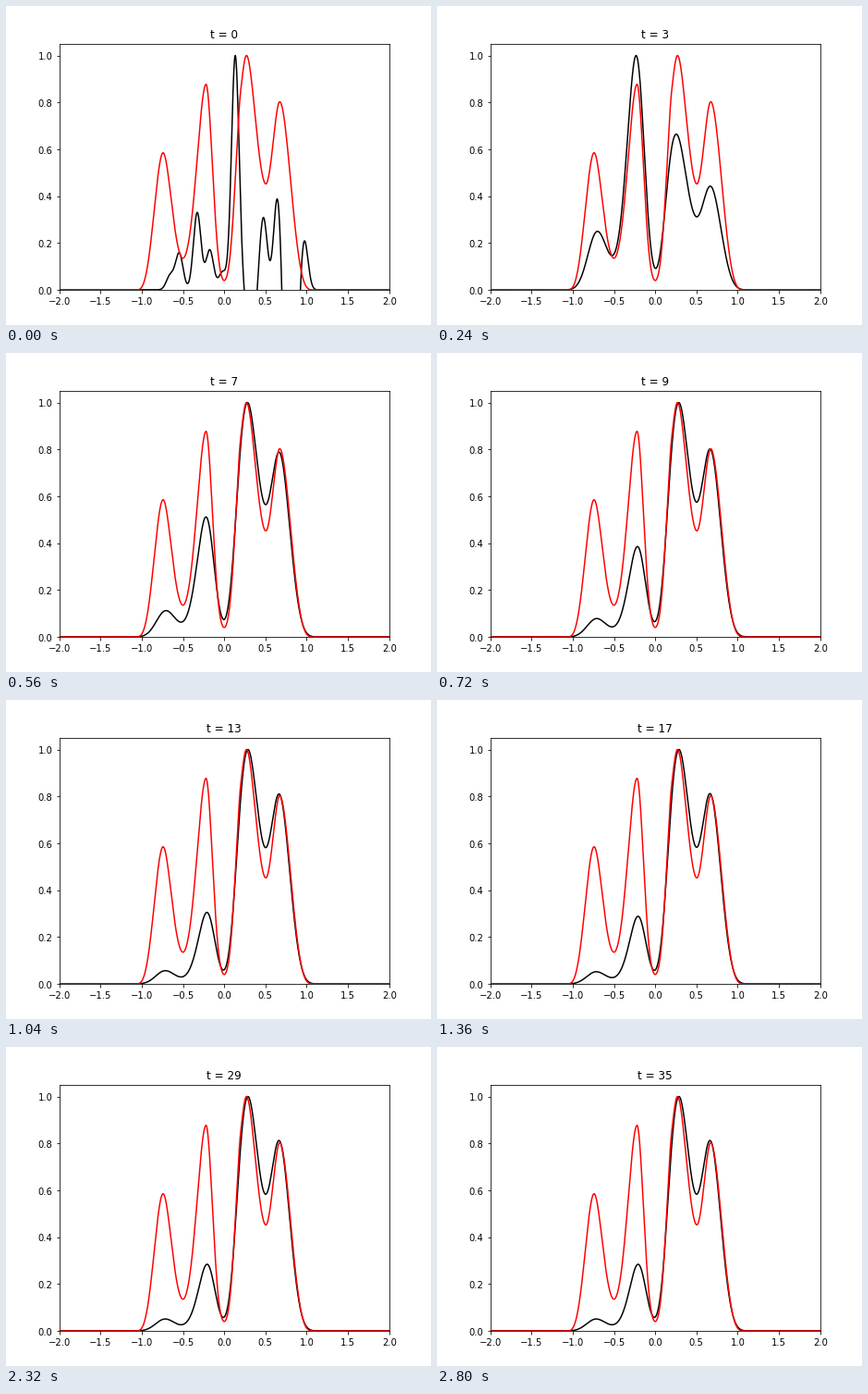
A matplotlib script that plays this animation: 460 px wide and 345 px high, repeating every 2.88 s.

```python
import numpy as np
import matplotlib.pyplot as plt
from matplotlib.animation import FuncAnimation
from matplotlib.transforms import ScaledTranslation

W, H, DPI = 460, 345, 72
STEPS = 36
x = np.linspace(-2, 2, 1601)


def bell(center, width):
    return np.exp(-((x - center) / width) ** 2 / 2)


def smooth_curve(points):
    """Shape-preserving cubic through the points, flat at its extremes and ends."""
    px, py = np.array(points, float).T
    h = np.diff(px)
    slope = np.diff(py) / h
    a, b = slope[:-1], slope[1:]
    same = a * b > 0
    m = np.zeros_like(px)
    m[1:-1][same] = 2 * a[same] * b[same] / (a[same] + b[same])
    xs = np.clip(x, px[0], px[-1])
    i = np.clip(np.searchsorted(px, xs, side="right") - 1, 0, len(h) - 1)
    u = (xs - px[i]) / h[i]
    return (py[i] * (1 + 2 * u) * (1 - u) ** 2
            + py[i + 1] * u ** 2 * (3 - 2 * u)
            + h[i] * u * (1 - u) * (m[i] * (1 - u) - m[i + 1] * u))


def blur(y, width):
    kernel = bell(0, width)
    return np.convolve(y, kernel / kernel.sum(), mode="same")


# Fixed landscape, given by its peaks and valleys
landscape = smooth_curve([(px, py ** 0.5) for px, py in [
    (-1.08, 0), (-0.741, 0.585), (-0.5, 0.135), (-0.22, 0.877), (0, 0.04),
    (0.2, 0.85), (0.27, 1), (0.505, 0.452), (0.673, 0.803), (1.09, 0)]]) ** 2

# Rough starting density: narrow bumps, some below zero
start = sum(height * bell(center, 0.046) for center, height in [
    (-0.655, 0.06), (-0.545, 0.155), (-0.327, 0.33), (-0.175, 0.17),
    (-0.02, 0.075), (0.134, 1), (0.325, -0.3), (0.475, 0.31),
    (0.646, 0.4), (0.78, -1), (0.85, -0.5), (0.967, 0.225)])

# Later densities: mass around each hill, drifting to a steady balance
hills = np.array([bell(c, 0.29) for c in (-0.74, -0.24, 0.25, 0.72)])
steady = np.array([0.056, 0.127, 0.74, 0.78])
excess = np.array([0.072, 0.608, -0.163, -0.078])


def density(t):
    y = start
    if t > 0:
        mass = steady + excess * 0.675 ** (t - 5)
        y = blur(landscape * (mass @ hills), 0.047)
    return y / y.max()


fig = plt.figure(figsize=(W / DPI, H / DPI), dpi=DPI)
ax = fig.add_axes([57.6 / W, 38.016 / H, 357.12 / W, 266.112 / H])
ax.set_xlim(-2, 2)
ax.set_ylim(0, 1.05)
line, = ax.plot(x, density(0), color="black", lw=1.5)
ax.plot(x, landscape, color="red", lw=1.5)
title = ax.set_title("t = 0")

# Tick labels sit a fraction of a pixel lower
nudge = ScaledTranslation(0, -0.6 / DPI, fig.dpi_scale_trans)
for label in ax.get_xticklabels() + ax.get_yticklabels():
    label.set_transform(label.get_transform() + nudge)


def update(t):
    line.set_ydata(density(t))
    title.set_text(f"t = {t}")
    return line, title


anim = FuncAnimation(fig, update, frames=STEPS, interval=80, repeat=True,
                     repeat_delay=0, blit=False)
plt.show()
```
